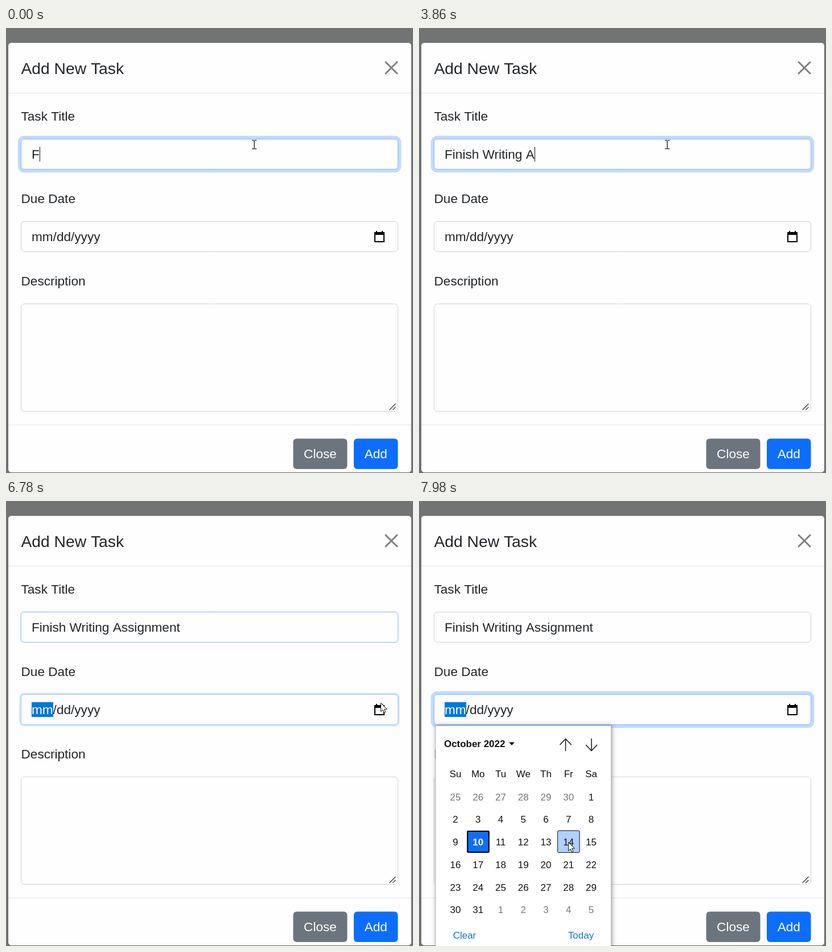
Recreate the animation shown at these times as an HTML page with a canvas. Size 715 by 783 pixels, loop 8 s.

```html
<!DOCTYPE html>
<html lang="en">
<head>
<meta charset="utf-8">
<title>Add New Task</title>
<style>
html, body { margin: 0; width: 100%; height: 100%; overflow: hidden; background: #727473; }
canvas { display: block; }
</style>
</head>
<body>
<canvas id="stage" width="715" height="783"></canvas>
<script>
const g = document.getElementById('stage').getContext('2d');
const LOOP = 8000, STEP = 39.75;
const INK = '#212529', BLUE = '#0d6efd', BORDER = '#ced4da';
const TITLE = 'Finish Writing Assignment';

// [time, typed text]
const typing = [[0, 'F'], [280, 'Fn'],
  ...[[710, 1], [840, 2], [960, 3], [1090, 4], [1630, 5], [1780, 6], [1900, 7], [2330, 8],
    [2610, 9], [2740, 10], [3050, 12], [3170, 13], [3450, 15], [3860, 16], [4140, 17],
    [4280, 19], [4860, 20], [5000, 21], [5130, 22], [5270, 23], [5400, 24], [5550, 25]]
    .map(([t, n]) => [t, TITLE.slice(0, n)])];

// [time, x, y, pointer shape]
const pointer = [[0, 436, 205, beam], [6100, 465, 238, beam], [6240, 583, 268, arrow],
  [6380, 641, 332, arrow], [6510, 658, 355, arrow], [7050, 649, 358, arrow],
  [7190, 500, 452, arrow], [7320, 303, 578, arrow], [7460, 301, 597, arrow],
  [7730, 288, 599, arrow], [7860, 268, 600, arrow], [7980, 262, 600, arrow]];

// [time, hovered column, hovered row]
const hover = [[0, -1, -1], [7320, 6, 1], [7460, 6, 2], [7860, 5, 2]];

const at = (list, t) => list.filter(e => e[0] <= t).pop();

function text(str, x, y, size = 22.6, color = INK, weight = 400, align = 'left') {
  g.font = `${weight} ${size}px "Liberation Sans", Arial, sans-serif`;
  g.textAlign = align;
  g.fillStyle = color;
  g.fillText(str, x, y);
}

function rect(x, y, w, h, color) {
  g.fillStyle = color;
  g.fillRect(x, y, w, h);
}

function box(x, y, w, h, r, fill, stroke, width = 1) {
  g.beginPath();
  g.roundRect(x, y, w, h, r);
  if (fill) { g.fillStyle = fill; g.fill(); }
  if (stroke) { g.strokeStyle = stroke; g.lineWidth = width; g.stroke(); }
}

function path(points, color, width, fill) {
  g.beginPath();
  points.forEach(([x, y]) => g.lineTo(x, y));
  if (fill) { g.closePath(); g.fillStyle = fill; g.fill(); }
  if (width) { g.strokeStyle = color; g.lineWidth = width; g.stroke(); }
}

// focus runs from 0 (none) to 1 (full ring)
function field(y, h, focus = 0) {
  const ring = 5.2 * focus;
  if (focus) box(26 - ring, y - ring, 663 + 2 * ring, h + 2 * ring, 6 + ring,
    `rgba(13,110,253,${0.25 * focus ** 0.5})`);
  const edge = focus === 1 ? '#86b7fe' : focus ? '#a3c6f4' : BORDER;
  box(26.5, y + 0.5, 662, h - 1, 5.5, '#fefefe', edge);
}

function button(x, w, label, color) {
  box(x, 722.5, w, 53.5, 6, color);
  text(label, x + w / 2, 756.5, 22.6, '#fff', 400, 'center');
}

function beam(x, y) {
  rect(x - 0.5, y - 7, 1.3, 15, '#111');
  for (const dy of [-8, 7]) {
    rect(x - 4, y + dy, 3.5, 1.2, '#111');
    rect(x + 0.8, y + dy, 3.5, 1.2, '#111');
  }
}

function arrow(x, y) {
  const shape = [[0, 0], [0, 15], [3.5, 11.8], [6, 17], [8.4, 16], [6, 10.8], [10.8, 10.8]];
  path([...shape, shape[0]].map(([a, b]) => [x + 0.5 + a, y + 0.5 + b]), '#111', 1, '#fff');
}

function dateIcon() {
  g.strokeStyle = '#000';
  g.lineWidth = 2;
  g.strokeRect(648, 360, 16, 16);
  rect(647, 359, 18, 5, '#000');
  rect(650, 357, 2, 3, '#000');
  rect(660, 357, 2, 3, '#000');
}

function calendar(t) {
  const [, hoverCol, hoverRow] = at(hover, t);
  const label = (s, x, y, color = '#111', weight = 400) =>
    text(s, x, y + 6, 16.95, color, weight, 'center');
  g.save();
  g.globalAlpha = t < 7050 ? 0.5 : 1;
  g.shadowColor = 'rgba(0,0,0,.4)';
  g.shadowBlur = 8;
  g.shadowOffsetX = 1;
  rect(29, 395, 309, 400, '#fff');
  g.shadowColor = 'transparent';
  g.strokeStyle = '#b5b5b5';
  g.lineWidth = 1;
  g.strokeRect(29, 395.5, 308.5, 400);

  text('October 2022', 44, 433, 16.95, '#111', 700);
  path([[158, 424.5], [168, 424.5], [163, 430]], '', 0, '#111');
  for (const [x, tip, tail] of [[257.5, 418.5, 440], [303, 439.5, 418]]) {
    path([[x, tail], [x, tip]], '#111', 1.5);
    path([[x - 10, 429], [x, tip], [x + 10, 429]], '#111', 1.5);
  }

  ['Su', 'Mo', 'Tu', 'We', 'Th', 'Fr', 'Sa'].forEach((d, i) => label(d, 64 + i * STEP, 480));
  for (let i = 0; i < 42; i++) {
    const col = i % 7, row = Math.floor(i / 7), day = i - 5;
    const x = 64 + col * STEP, y = 520.5 + row * STEP;
    const inMonth = day > 0 && day <= 31, chosen = day === 10;
    if (chosen) box(x - 18.5, y - 19, 37.5, 37, 1, '#0d6efd', '#000', 2.2);
    if (col === hoverCol && row === hoverRow) box(x - 19.2, y - 20, 38.5, 38.5, 2, '#b0d0fd', '#111');
    label(inMonth ? day : day < 1 ? day + 30 : day - 31, x, y,
      chosen ? '#fff' : inMonth ? '#111' : '#767676', chosen ? 700 : 400);
  }
  label('Clear', 80, 763.5, '#0f74c8');
  label('Today', 284.5, 763.5, '#0f74c8');
  g.restore();
}

function draw(t) {
  const dateActive = t >= 6780, settled = t >= 6900;
  rect(0, 0, 715, 783, '#727473');
  box(3.5, 25.5, 709, 757, 6, '#fefefe', '#5f6160');
  rect(4, 114, 708, 1, '#dee2e6');
  rect(4, 698, 708, 1, '#dee2e6');

  text('Add New Task', 26.5, 80.5, 28.25);
  g.lineCap = 'round';
  path([[667, 60], [687, 80]], '#7f7f7f', 3);
  path([[687, 60], [667, 80]], '#7f7f7f', 3);
  g.lineCap = 'butt';
  ['Task Title', 'Due Date', 'Description'].forEach((s, i) => text(s, 26.5, 163 + 145 * i));

  field(195, 54, settled ? 0 : dateActive ? 0.25 : 1);
  const typed = at(typing, t)[1];
  text(typed, 45, 230);
  const caretOn = t < 5960 || (t >= 6510 && !dateActive);
  if (caretOn) rect(Math.round(45 + g.measureText(typed).width), 209, 1, 26, '#111');

  field(340, 54, settled ? 1 : dateActive ? 0.5 : 0);
  if (dateActive) rect(45, 354, 38, 26, '#0078d7');
  text('mm', 45, 375, 22.6, dateActive ? '#fff' : INK);
  text('/dd/yyyy', 82.6, 375);
  dateIcon();

  field(485, 190);
  path([[673.5, 672], [684.5, 661]], '#444', 1.4);
  path([[679.5, 672], [684.5, 667]], '#444', 1.4);

  button(504.5, 95, 'Close', '#6c757d');
  button(611, 77.5, 'Add', BLUE);

  if (settled) calendar(t);
  const [, x, y, shape] = at(pointer, t);
  shape(x, y);
}

const start = performance.now();
function tick() {
  draw((performance.now() - start) % LOOP);
  requestAnimationFrame(tick);
}
tick();
</script>
</body>
</html>
```
